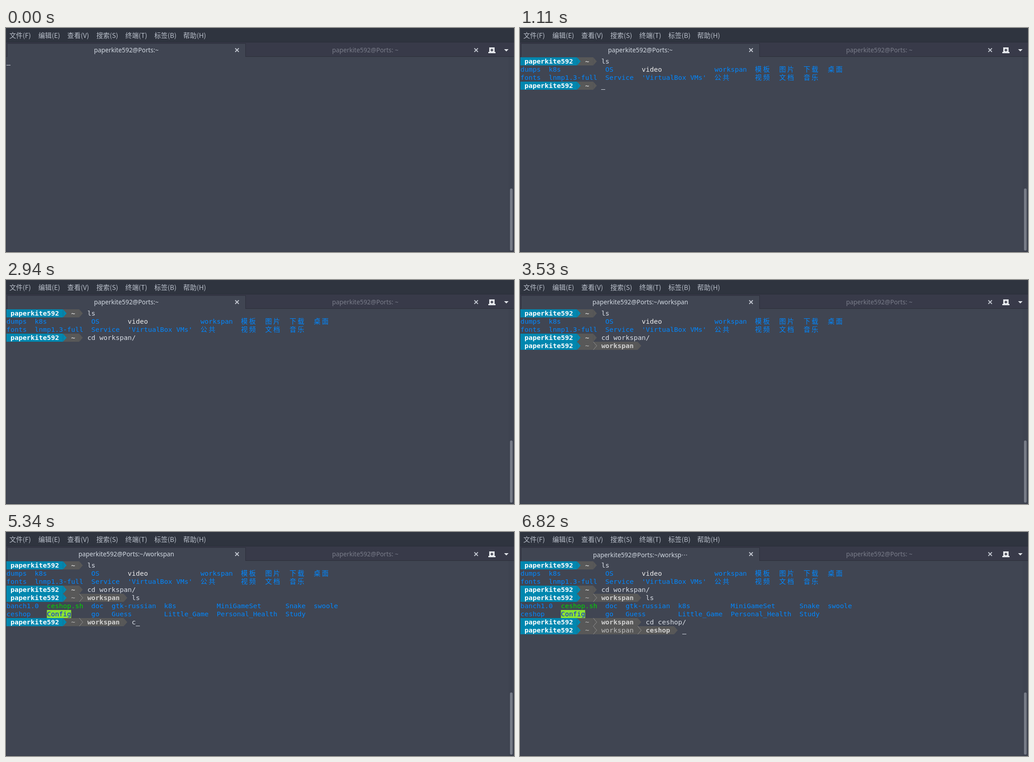
Write an HTML page with a canvas that moves like this. It is 1127 px wide and 497 px high and loops after 8 s.

```html
<!DOCTYPE html>
<html lang="zh">
<head>
<meta charset="utf-8">
<style>
html, body { margin: 0; width: 100%; height: 100%; overflow: hidden; background: #404552; }
canvas { display: block; }
</style>
</head>
<body>
<canvas id="stage" width="1127" height="497"></canvas>
<script>
const ctx = document.getElementById('stage').getContext('2d');
const LOOP = 8000, CELL = 8.97, ROW = 18, TOP = 65;
const UI = '"Noto Sans", "Noto Sans CJK SC", "Noto Sans CJK", sans-serif';
const CJK = '"Noto Sans CJK SC", "Noto Sans CJK", sans-serif';
const MONO = '"DejaVu Sans Mono", "Noto Sans CJK SC", "Noto Sans CJK", monospace';
const BLUE = '#0087ff', FG = '#d9dee6', USER = 'paperkite592', HOST = USER + '@Ports:';

const colX = col => 1 + col * CELL;
const rowY = row => TOP + row * ROW;

function rect(x, y, w, h, color) {
  ctx.fillStyle = color;
  ctx.fillRect(x, y, w, h);
}

function poly(points, color) {
  ctx.fillStyle = color;
  ctx.beginPath();
  points.forEach(([x, y]) => ctx.lineTo(x, y));
  ctx.fill();
}

function line(points, color, width) {
  ctx.strokeStyle = color;
  ctx.lineWidth = width;
  ctx.beginPath();
  points.forEach(([x, y], i) => i ? ctx.lineTo(x, y) : ctx.moveTo(x, y));
  ctx.stroke();
}

function label(text, x, y, size, color, family, align = 'left') {
  ctx.font = `${size}px ${family}`;
  ctx.fillStyle = color;
  ctx.textAlign = align;
  ctx.fillText(text, x, y);
}

// Terminal text on the cell grid; CJK characters take two cells.
function put(col, row, text, color = FG, bold = false) {
  ctx.font = `${bold ? 'bold ' : ''}14.9px ${MONO}`;
  ctx.fillStyle = color;
  ctx.textAlign = 'left';
  for (const ch of text) {
    if (ch !== ' ') ctx.fillText(ch, colX(col), rowY(row) + 14);
    col += ch > '\u2e80' ? 2 : 1;
  }
}

function cells(col, row, count, color) {
  rect(colX(col), rowY(row), count * CELL, ROW, color);
}

function chevron(col, row) {
  const x = colX(col), y = rowY(row);
  return [[x, y], [x + CELL - 1, y + ROW / 2], [x, y + ROW]];
}

function prompt(row, ...path) {
  cells(0, row, 14, '#0087af');
  put(1, row, USER, '#fff', true);
  let col = 14;
  path.forEach((dir, i) => {
    const last = i === path.length - 1;
    cells(col, row, dir.length + 3, '#585858');
    if (i) line(chevron(col, row), '#949494', 1);
    else poly(chevron(col, row), '#0087af');
    put(col + 2, row, dir, last ? '#d0d0d0' : '#bcbcbc', last);
    col += dir.length + 3;
  });
  poly(chevron(col, row), '#585858');
}

// Each stamp is [time, number of characters visible from then on].
function typed(t, col, row, text, stamps) {
  const stamp = stamps.filter(s => t >= s[0]).pop();
  if (stamp) put(col, row, text.slice(0, stamp[1]));
}

function listHome() {
  put(0, 1, 'dumps  k8s           OS', BLUE);
  put(30, 1, 'video', '#eeeeee');
  put(48, 1, 'workspan  模板  图片  下载  桌面', BLUE);
  put(0, 2, "fonts  lnmp1.3-full  Service  'VirtualBox VMs'  公共      视频  文档  音乐", BLUE);
}

function listWork() {
  put(0, 5, 'banch1.0', BLUE);
  put(10, 5, 'ceshop.sh', '#00d700');
  put(21, 5, 'doc  gtk-russian  k8s          MiniGameSet      Snake  swoole', BLUE);
  put(0, 6, 'ceshop', BLUE);
  cells(10, 6, 6, '#8ae234');
  put(10, 6, 'Config', '#0a20e8');
  put(21, 6, 'go   Guess        Little_Game  Personal_Health  Study', BLUE);
}

// [time, column, row]; a missing column hides the cursor.
const cursorStops = [
  [0, 0, 0], [20, 20, 0], [690, 21, 0], [800, 22, 0], [980, 0, 1], [1080, 0, 3],
  [1110, 20, 3], [2090, 21, 3], [2150, 22, 3], [2350],
  [5340, 32, 7], [5450, 33, 7], [5550, 34, 7], [5700, 35, 7], [5890, 36, 7],
  [6090, 41, 7], [6690, 0, 8], [6820, 40, 8]
];

function cross(x) {
  line([[x - 4, 45], [x + 4, 53]], '#c3c8d1', 2);
  line([[x + 4, 45], [x - 4, 53]], '#c3c8d1', 2);
}

function chrome(t) {
  rect(0, 0, 1127, 497, '#404552');
  rect(0, 0, 1127, 32, '#2f343f');
  rect(0, 31, 1127, 1, '#292d37');
  rect(0, 32, 1127, 32, '#383a49');
  rect(0, 63, 1127, 1, '#2b2e39');
  rect(2, 34, 530, 30, '#2b2e39');
  rect(3, 35, 528, 29, '#404552');
  rect(0, 64, 1, 433, '#353945');
  rect(0, 496, 1127, 1, '#353945');
  rect(1115, 64, 12, 432, '#3e4350');

  ['文件(F)', '编辑(E)', '查看(V)', '搜索(S)', '终端(T)', '标签(B)', '帮助(H)']
    .forEach((item, i) => label(item, 7.5 + i * 64.3, 22, 14.8, '#b9bfca', CJK));

  const away = t >= 6820;
  const title = HOST + (away ? '~/worksp⋯' : t >= 3530 ? '~/workspan' : '~');
  label(title, 267, away ? 56 : 54, 13.8, '#d3dae3', UI, 'center');
  label(HOST + ' ~', 797, 54, 13.8, '#7a7d8a', UI, 'center');
  cross(512.5);
  cross(1043);

  rect(1072, 43, 12, 10, '#e4e7ec');
  rect(1070, 53, 16, 3, '#e4e7ec');
  rect(1075, 48, 6, 2, '#383a49');
  rect(1077, 46, 2, 6, '#383a49');
  poly([[1105, 47], [1115, 47], [1110, 52]], '#e4e7ec');

  ctx.fillStyle = '#767b87';
  ctx.beginPath();
  ctx.roundRect(1118, 356, 6, 138, 3);
  ctx.fill();
}

function draw(t) {
  chrome(t);
  if (t >= 20) prompt(0, '~');
  typed(t, 20, 0, 'ls', [[690, 1], [800, 2]]);
  if (t >= 1080) listHome();
  if (t >= 1110) prompt(3, '~');
  typed(t, 20, 3, 'cd workspan/', [[2090, 1], [2150, 2], [2350, 3], [2720, 4], [2830, 5], [2940, 12]]);
  if (t >= 3530) prompt(4, '~', 'workspan');
  typed(t, 31, 4, 'ls', [[3770, 1], [3860, 2]]);
  if (t >= 4140) listWork();
  if (t >= 4170) prompt(7, '~', 'workspan');
  typed(t, 31, 7, 'cd ceshop/', [[5340, 1], [5450, 2], [5550, 3], [5700, 4], [5890, 5], [6090, 10]]);
  if (t >= 6820) prompt(8, '~', 'workspan', 'ceshop');

  const [, col, row] = cursorStops.filter(s => t >= s[0]).pop();
  if (col !== undefined) rect(Math.round(colX(col)), rowY(row) + 17, 9, 1, FG);
}

const start = performance.now();
function tick() {
  draw((performance.now() - start) % LOOP);
  requestAnimationFrame(tick);
}
tick();
</script>
</body>
</html>
```
